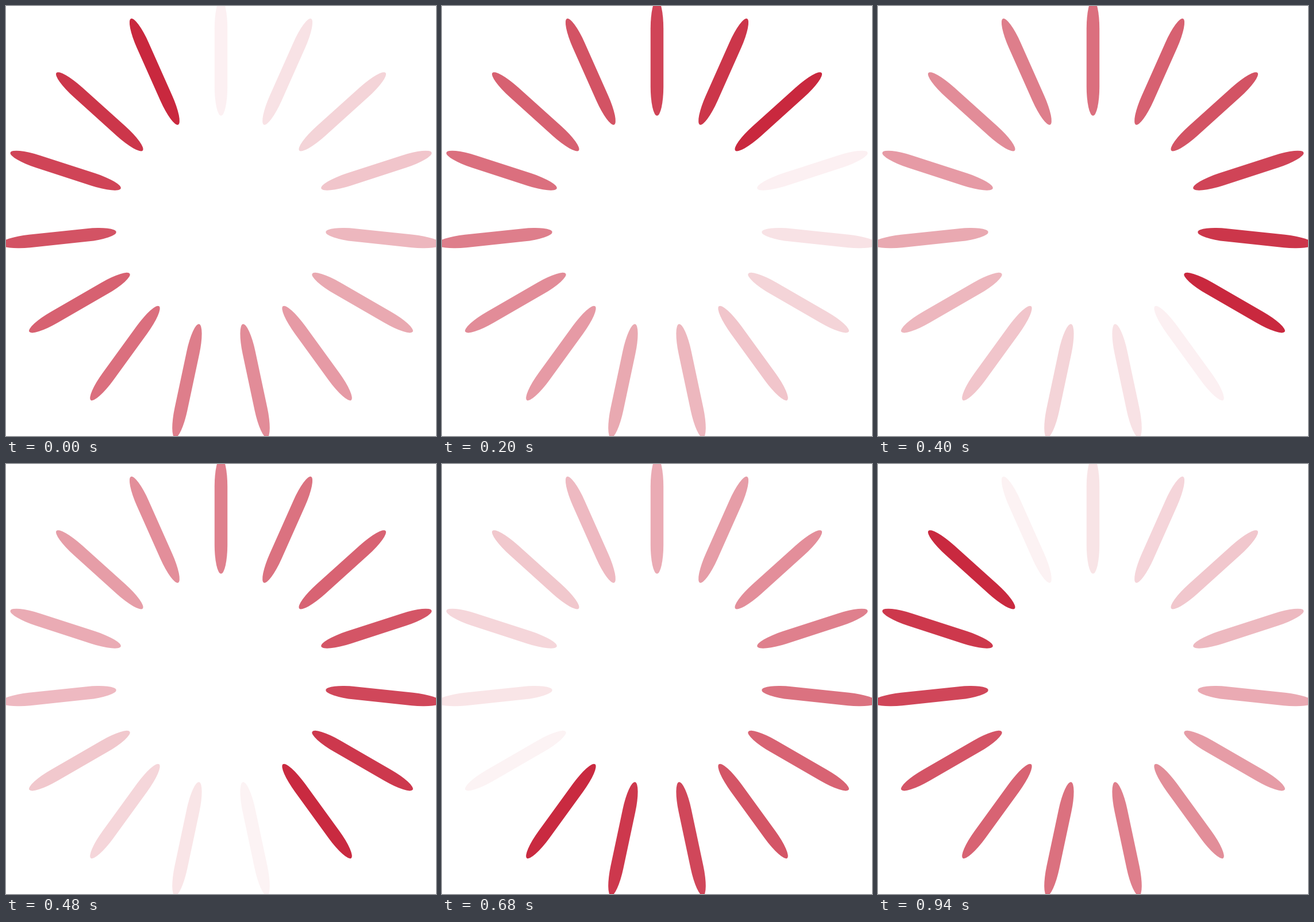
Write an HTML page with a canvas that moves like this. It is 748 by 748 pixels and loops after 1000 ms.

```html
<!DOCTYPE html>
<html lang="en">
<head>
<meta charset="utf-8">
<title>Spinner</title>
<style>
  html, body { margin: 0; width: 100%; height: 100%; overflow: hidden; background: #fff; }
  canvas { display: block; width: 748px; height: 748px; }
</style>
</head>
<body>
<canvas id="stage" width="748" height="748"></canvas>
<script>
const ctx = document.getElementById('stage').getContext('2d');
const BARS = 15, LOOP = 1000, UNIT = 7.48;
const RADIUS = 38, HALF_W = 1.5, HALF_H = 13.5, CAP = 6.75;

// One tick per bar, rounded up to 20 ms, plus a short first tick.
const ticks = [0, 20];
for (let k = 1; k < BARS; k++) ticks.push(20 * Math.ceil(k * 10 / 3));

const bar = new Path2D();
const side = HALF_H - CAP;
bar.ellipse(0, -RADIUS - side, HALF_W, CAP, 0, Math.PI, 2 * Math.PI);
bar.ellipse(0, -RADIUS + side, HALF_W, CAP, 0, 0, Math.PI);
bar.closePath();

function draw(ms) {
  const t = ticks.filter(tick => tick <= ms).pop();
  ctx.setTransform(UNIT, 0, 0, UNIT, 374, 374);
  ctx.clearRect(-50, -50, 100, 100);
  ctx.fillStyle = '#c9283e';
  for (let i = 0; i < BARS; i++) {
    const age = (t + (BARS - 1 - i) * LOOP / BARS + 1e-6) % LOOP;
    ctx.globalAlpha = 1 - age / LOOP;
    ctx.fill(bar);
    ctx.rotate(2 * Math.PI / BARS);
  }
}

const start = performance.now();
function frame() {
  draw((performance.now() - start) % LOOP);
  requestAnimationFrame(frame);
}
frame();
</script>
</body>
</html>
```
